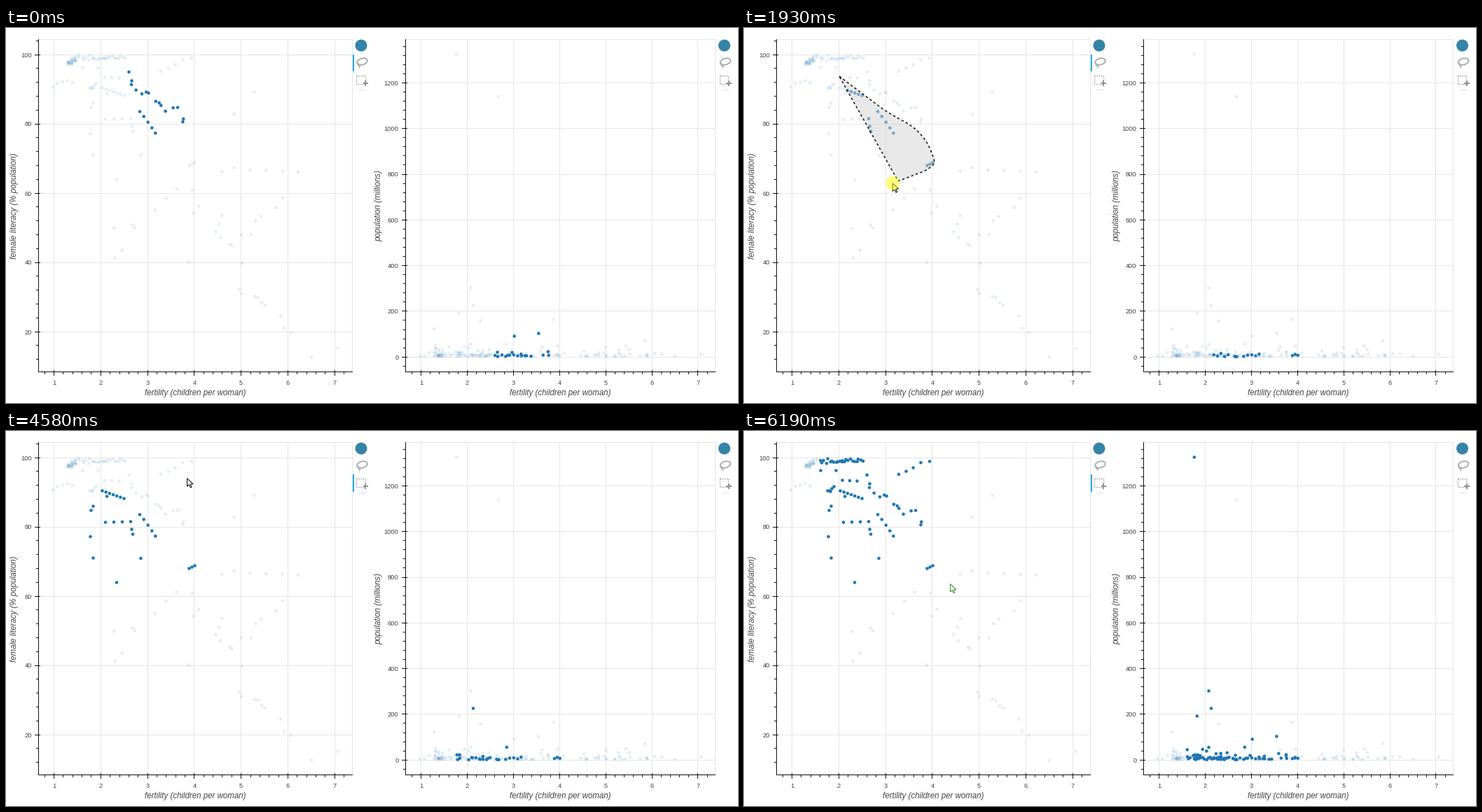
These frames come from a looping animation (1045 by 536 pixels, 6500 ms). A matplotlib script:

```python
import numpy as np
import matplotlib.pyplot as plt
from matplotlib.animation import FuncAnimation
from matplotlib.collections import LineCollection
from matplotlib.colors import to_rgba
from matplotlib.patches import Circle, Ellipse, Polygon, Rectangle
from matplotlib.path import Path

W, H, PT = 1045, 536, 0.72            # stage in pixels, points per pixel
LOOP, INTERVAL = 6500, 20
STEP, START = 77.7, 210               # the screen refreshes in coarse steps
plt.rcParams["font.family"] = "Liberation Sans"

fig = plt.figure(figsize=(W / 100, H / 100), dpi=100, facecolor="white")
ax = fig.add_axes([0, 0, 1, 1])
ax.set(xlim=(0.5, W + 0.5), ylim=(H + 0.5, 0.5))   # whole numbers are pixel centres
ax.axis("off")

# Data, in pixels of the left plot
rng = np.random.default_rng(4)


def strand(n, start, end, jitter=0):
    return np.linspace(start, end, n) + rng.uniform(-1, 1, (n, 2)) * jitter


# x, y and height in the right plot of the most populous places
GIANTS = np.array([(120, 86, 38), (181, 282, 98.5), (141, 43, 372), (144.5, 94, 397),
                   (124, 87, 408), (155, 287, 419), (261, 335, 417), (204, 93.5, 441)])
crowd = np.vstack([
    strand(26, (86, 52), (103, 43), (3, 4)),          # dense corner and top edge
    strand(5, (67, 84.5), (95, 74), (0, 5)),
    strand(22, (109, 43.5), (170, 43.5), (1, 4)),
    strand(2, (110, 57), (132, 57)),
    strand(3, (123, 86), (129, 80)),
    strand(3, (141, 71), (162, 72)),
    strand(5, (220, 63), (264, 42), 2),
    strand(14, (172, 66), (255, 132), (6, 9)),        # falling band
    strand(7, (138, 86), (169, 97)),
    strand(2, (125, 108), (122, 114)),
    strand(5, (190.5, 120), (214, 151.5), 1),
    strand(4, (142.5, 131), (178.5, 130)),
    strand(2, (180, 141), (181.5, 148)),
    strand(2, (121, 151.5), (125, 182)),
    strand(2, (193, 182.5), (158.5, 217)),
    strand(3, (262, 197), (270, 193)),
    strand(6, (165, 330), (230, 222), 16),            # sparse tail
    strand(2, (326.5, 124), (355, 92.5)),
    strand(6, (305.5, 202), (419.5, 203), 4),
    strand(11, (272, 247), (343, 328), 16),
    strand(5, (347, 290), (392, 238), 7),
    strand(9, (332, 366), (400, 427), 12),
    strand(2, (436.5, 471), (474, 458.5))])
heights = 470.5 - rng.lognormal(1.1, 1, len(crowd)).clip(0, 40)
points = np.vstack([crowd, GIANTS[:, :2]])
right = np.column_stack([593 + (points[:, 0] - 69) / 66.8 * 65.9,
                         np.append(heights, GIANTS[:, 2])])


def inside(corners):
    return Path(corners).contains_points(points)


# Axes, grids and labels
def segments(lines, color, z):
    crisp = np.floor(np.array(lines) + 0.5)
    ax.add_collection(LineCollection(crisp, colors=color, linewidths=PT, zorder=z,
                                     snap=False, capstyle="projecting"))


def label(x, y, text, px=9.3, **kw):
    ax.text(x, y, text, fontsize=px * PT, color="#444444",
            **{"ha": "center", "va": "center_baseline", **kw})


def plot_frame(x0, x1, one, unit, y_pos, majors, minors, y_title, title_x):
    top, bottom = 16.5, 492
    grid, ticks = [], [[(x0, top), (x0, bottom)], [(x0, bottom), (x1, bottom)]]
    for k in range(4, 37):
        x = one + (k / 5 - 1) * unit
        if x0 < x < x1:
            major = k % 5 == 0
            ticks.append([(x, bottom - 2 * major), (x, bottom + (5 if major else 3))])
            if major:
                grid.append([(x, top), (x, bottom)])
                label(x, 506.5, str(k // 5))
    for v in minors:
        y = y_pos(v)
        major = v in majors
        ticks.append([(x0 + 2 * major, y), (x0 - (5 if major else 3), y)])
        if major:
            grid.append([(x0, y), (x1, y)])
            label(x0 - 9.5, y, str(v), ha="right")
    grid += [[(x0, top), (x1, top)], [(x1, top), (x1, bottom)]]
    segments(grid, "#e5e5e5", 1)
    segments(ticks, "#111111", 5)
    label((x0 + x1) / 2, 521.5, "fertility (children per woman)", 11.55, style="italic")
    label(title_x, 254.5, y_title, 11.55, style="italic", rotation=90, va="center")


plot_frame(47, 494.5, 69, 66.8, lambda v: 38.5 + (100 - v) * 4.95,
           range(20, 101, 20), range(12, 105, 4), "female literacy (% population)", 13)
plot_frame(570.5, 1013, 593, 65.9, lambda v: 470.7 - v * 0.3265,
           range(0, 1201, 200), range(-40, 1361, 40), "population (millions)", 532.5)


def toolbar(x):
    gray = "#a8adb0"
    ax.add_patch(Circle((x, 25.5), 8.5, fc="#3583a6", lw=0))
    ax.add_patch(Ellipse((x + 1.5, 48.5), 15, 9, angle=-15, fill=False, ec=gray, lw=1.9 * PT))
    ax.plot([x - 4, x - 4.5, x - 1.5, x - 2.5], [51, 54, 54.5, 57], color=gray, lw=1.5 * PT)
    ax.add_patch(Rectangle((x - 7, 68.5), 12.5, 12, fill=False, ec="#999ea1",
                           lw=1.4 * PT, ls=(0, (1.1, 1.1))))
    ax.plot([x + 3.5, x + 9], [79, 79], color="#8d9295", lw=2 * PT)
    ax.plot([x + 6.2, x + 6.2], [76, 82], color="#8d9295", lw=2 * PT)
    ax.plot([x - 4, x + 5], [88.5, 88.5], color="#dddddd", lw=PT)


toolbar(507.5)
toolbar(1026)

# Pointer route: time in ms, x, y
ROUTE = np.array([
    (210, 502, 392), (520, 215, 148), (700, 92, 73), (860, 136.5, 69.5),       # enter
    (940, 136.5, 69.5), (1300, 205, 121), (1390, 256, 149), (1455, 272, 187),  # lasso
    (1620, 272, 195), (1700, 262, 203.5), (2020, 190, 231), (2160, 153, 233),
    (2385, 97.5, 203), (2600, 84, 181), (2870, 84, 168),
    (3480, 84, 168), (3870, 330, 125), (4090, 518, 62), (4250, 516, 77),       # toolbar
    (4330, 510, 77), (4560, 253, 69), (4850, 112, 40), (5020, 107.5, 37),      # and back
    (5190, 128, 50), (5490, 239, 120.5), (5640, 265, 155),                     # box
    (5720, 265, 155), (6140, 295, 219)])
PRESS, LASSO_END, RELEASE = 880, 2870, 3060
TOOL_CLICK, BOX_START, BOX_END = 4300, 5000, 5700


def along(t):
    """Position at each time, averaged over a short window to round the corners."""
    window = np.add.outer(t, np.linspace(-40, 40, 9))
    return np.stack([np.interp(window, ROUTE[:, 0], ROUTE[:, i]).mean(-1)
                     for i in (1, 2)], -1)


def lasso_shape(t):
    # the outline trails the pointer slightly until it stops
    return along(np.linspace(900, max(900, min(t - 35, LASSO_END)), 80))


first_pick = inside([(163, 55), (205, 57), (268, 138), (214, 158), (172, 100)])
lasso_pick = inside(lasso_shape(RELEASE))
box_pick = inside([(107.5, 36), (267, 36), (267, 157), (107.5, 157)])

# Moving parts
dot = dict(s=(4.6 * PT) ** 2, linewidths=0, zorder=3)
dots_left = ax.scatter(*points.T, **dot)
dots_right = ax.scatter(*right.T, **dot)
gray_fill = to_rgba("lightgrey", 0.5)
lasso = ax.add_patch(Polygon([(0, 0)] * 3, fc=gray_fill, ec="#222222", lw=1.7 * PT,
                             ls=(0, (2, 2)), zorder=6))
box = ax.add_patch(Rectangle((107.5, 37.5), 0, 0, fc=gray_fill, ec="#707070", lw=2 * PT,
                             ls=(0, (2, 1.2)), zorder=6))
active = ax.add_patch(Rectangle((495.5, 38), 2, 24.5, fc="#26aae1", lw=0, zorder=4))
ARROW = np.array([(0, 0), (0, 11.5), (2.7, 9), (4.8, 13.2), (6.6, 12.4), (4.6, 8.3), (8.4, 8)])
pointer = ax.add_patch(Polygon(ARROW, fc="white", ec="black", lw=PT, zorder=8))
halo = ax.add_patch(Circle((0, 0), 10, fc="#ffff00", alpha=0.5, lw=0, zorder=9))
FAINT, FULL = to_rgba("#1f77b4", 0.12), to_rgba("#1f77b4")


def selection(t):
    if t < PRESS:
        return first_pick
    if t < LASSO_END:
        picked = inside(lasso_shape(t))
        return picked if picked.any() else np.ones(len(points), bool)
    return lasso_pick | box_pick if t > BOX_END else lasso_pick


def update(i):
    now = (i + 0.5) * INTERVAL
    t = START + STEP * np.floor((now - START + 5) / STEP)
    tip = along(t)

    colors = np.where(selection(t)[:, None], FULL, FAINT)
    dots_left.set_facecolor(colors)
    dots_right.set_facecolor(colors)

    lassoing, boxing = PRESS < t < RELEASE, BOX_START < t < BOX_END
    lasso.set_visible(lassoing)
    lasso.set_xy(lasso_shape(t))
    box.set_visible(boxing)
    box.set_width(tip[0] + 2.5 - 107.5)
    box.set_height(tip[1] + 2.5 - 37.5)
    active.set_y(62.5 if t > TOOL_CLICK else 38)

    pointer.set_visible(t >= START)
    pointer.set_xy(ARROW + tip)
    pointer.set_edgecolor("#2f8f2f" if t > BOX_END else "black")
    halo.set_visible(lassoing or boxing)
    halo.center = tuple(tip)
    return dots_left, dots_right, lasso, box, active, pointer, halo


anim = FuncAnimation(fig, update, frames=LOOP // INTERVAL, interval=INTERVAL,
                     repeat=True, repeat_delay=0)
plt.show()
```
